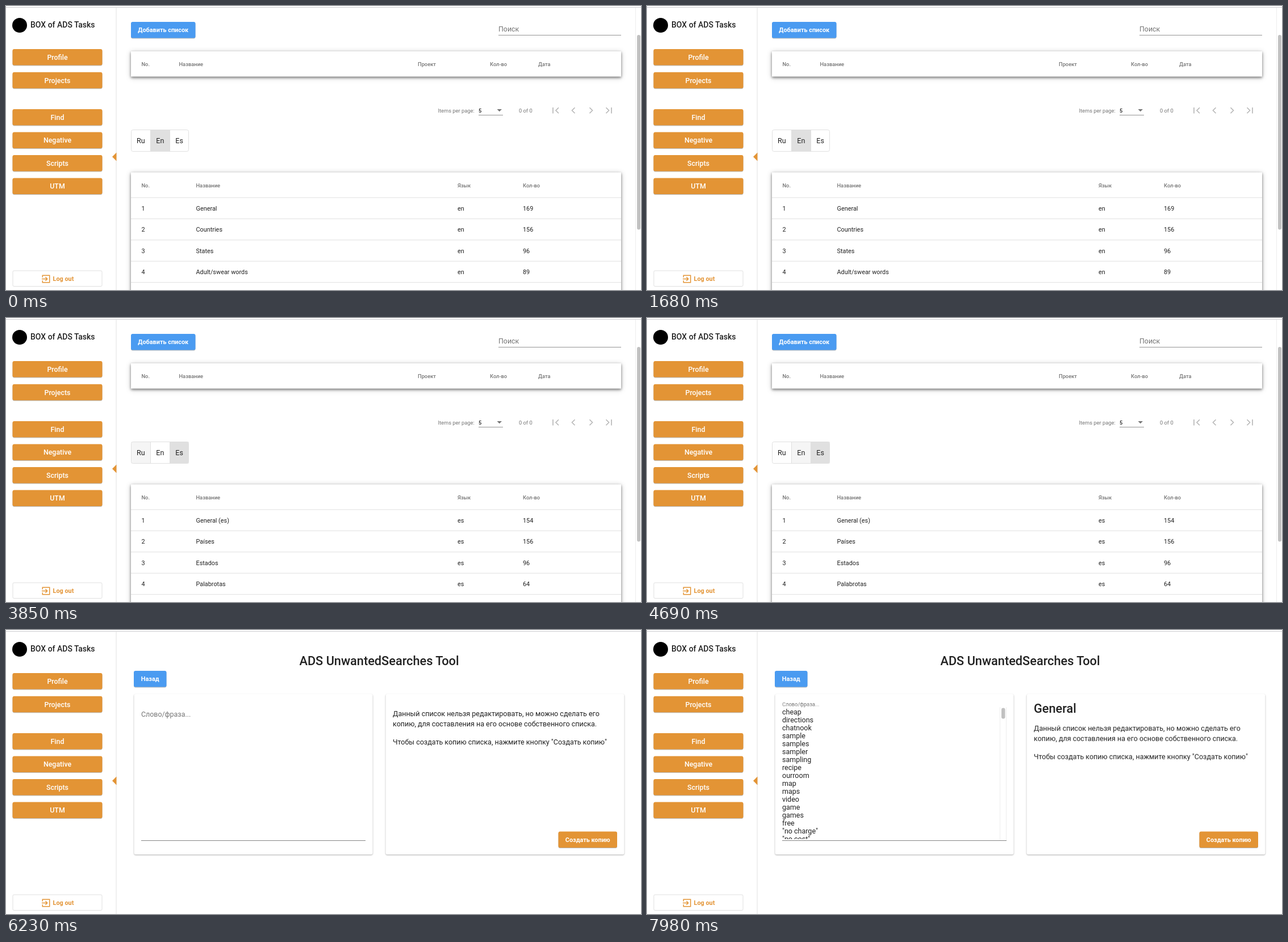
An HTML page for the animation above (8 s loop, 1118x501 px).

```html
<!DOCTYPE html>
<html lang="ru">
<head>
<meta charset="utf-8">
<title>Списки слов</title>
<style>
  html, body { margin: 0; width: 100%; height: 100%; overflow: hidden; background: #fff; }
  svg { display: block; font-family: Roboto, sans-serif; }
  text { fill: #212121; white-space: pre; }
  .body { font-size: 12.5px; }
  .cell { font-size: 10.87px; }
  .head { font-size: 9.32px; font-weight: 500; fill: #757575; }
  .note { font-size: 9.32px; fill: #757575; }
  .strong { font-size: 9.32px; font-weight: 500; }
  .hint { font-size: 12.42px; fill: #757575; }
  .menu { font-size: 12.42px; font-weight: 500; fill: #fff; }
  .action { font-size: 10.87px; font-weight: 700; fill: #fff; }
  .exit { font-size: 10.87px; font-weight: 700; fill: #e39435; }
  .brand { font-size: 13.98px; font-weight: 500; }
  .title { font-size: 21.74px; font-weight: 500; }
  .mid { text-anchor: middle; }
  .line { fill: none; stroke: #e0e0e0; }
  .button { filter: drop-shadow(0 1.2px .7px rgba(0,0,0,.28)); }
  .table { fill: #fff; filter: drop-shadow(0 2px 2px rgba(0,0,0,.45)) drop-shadow(0 1px 4px rgba(0,0,0,.22)); }
  .card { fill: #fff; filter: drop-shadow(0 1px .8px rgba(0,0,0,.32)); }

  .lists, .editor, .en, .es, .words { animation: 8s step-end infinite; }
  .lists { animation-name: lists; }
  .editor { animation-name: editor; }
  .en { animation-name: en; }
  .es { animation-name: es; }
  .words { animation-name: words; }
  .ruTab, .enTab, .esTab { animation: 8s linear infinite; }
  .ruTab { animation-name: ruTab; }
  .enTab { animation-name: enTab; }
  .esTab { animation-name: esTab; }
  .float { animation: float 8s cubic-bezier(.25,.8,.25,1) infinite; }
  .shift { animation: shift 8s step-end infinite; }

  @keyframes lists { 0% { opacity: 1 } 77%, 100% { opacity: 0 } }
  @keyframes editor { 0% { opacity: 0 } 77%, 100% { opacity: 1 } }
  @keyframes en { 0% { opacity: 1 } 35.875% { opacity: 0 } 62.125%, 100% { opacity: 1 } }
  @keyframes es { 0% { opacity: 0 } 35.875% { opacity: 1 } 62.125%, 100% { opacity: 0 } }
  @keyframes words { 0% { opacity: 0 } 79.5%, 100% { opacity: 1 } }
  @keyframes shift { 0% { transform: none } 79.5%, 100% { transform: translateY(25.8px) } }
  @keyframes float {
    0%, 79.5% { transform: translate(238px, 153px) }
    84.5%, 100% { transform: translate(238px, 134.4px) scale(.75) }
  }
  @keyframes ruTab { 0%, 43.75% { fill: #fff } 46%, 56% { fill: #f5f5f5 } 59%, 100% { fill: #fff } }
  @keyframes enTab {
    0%, 35.87% { fill: #e0e0e0 } 35.9%, 56% { fill: #fff } 58%, 62.12% { fill: #f5f5f5 }
    62.6%, 72% { fill: #c8c8c8 } 76%, 100% { fill: #e0e0e0 }
  }
  @keyframes esTab {
    0%, 28% { fill: #fff } 30%, 35.87% { fill: #f5f5f5 } 36.4%, 43.75% { fill: #c8c8c8 }
    47%, 62.12% { fill: #e0e0e0 } 62.2%, 100% { fill: #fff }
  }
</style>
</head>
<body>
<script>
const ORANGE = '#e39435', BLUE = '#4a9bf1';

const text = (x, y, cls, str) => `<text x="${x}" y="${y}" class="${cls}">${str}</text>`;
const rect = (x, y, w, h, attrs = '') => `<rect x="${x}" y="${y}" width="${w}" height="${h}" ${attrs}/>`;
const path = (d, attrs = 'class="line"') => `<path d="${d}" ${attrs}/>`;
const group = (cls, ...parts) => `<g class="${cls}">${parts.join('')}</g>`;
const button = (x, y, w, color, cls, label) =>
  rect(x, y, w, 28.5, `rx="3" fill="${color}" class="button"`) +
  text(x + w / 2, y + (cls === 'menu' ? 18.8 : 18.2), cls + ' mid', label);

const menu = [['Profile', 76], ['Projects', 116.7], ['Find', 182], ['Negative', 222.5], ['Scripts', 263], ['UTM', 303.4]];

const sidebar = group('sidebar',
  path('M0 2.5H1118', 'stroke="#cdcdd0"'),
  path('M194 3V501'),
  '<circle cx="24" cy="34" r="13"/>',
  text(43, 38.3, 'brand', 'BOX of ADS Tasks'),
  ...menu.map(([label, y]) => button(11.5, y, 158, ORANGE, 'menu', label)),
  path('M194.5 258.5V273.5L187 266Z', `fill="${ORANGE}"`),
  rect(12, 467, 157, 27.5, 'rx="2" class="line"'),
  path('M64.3 478.8V475.2H76.7V487.8H64.3V484.2M63 481.5H72.4M69.4 478.2L72.7 481.5L69.4 484.8',
    `fill="none" stroke="${ORANGE}" stroke-width="1.5"`),
  text(82.5, 485, 'exit', 'Log out'));

const rows = (lang, items) => group(lang, ...items.map(([name, count], i) => {
  const y = 361 + i * 37.4;
  return text(334.5, y, 'cell', name) + text(795, y, 'cell', lang) + text(910, y, 'cell', count);
}));

const tab = (x, w, name, label) =>
  rect(x, 218.5, w, 38, `class="${name}"`) + text(x + w / 2, 242, 'body mid', label);

const lists = group('lists',
  button(220, 28, 113.5, BLUE, 'action', 'Добавить список'),
  text(867, 44.8, 'hint', 'Поиск'),
  path('M867 51.5H1083', 'stroke="#949494"'),
  rect(220, 80, 863, 44.5, 'class="table"'),
  ...[[238.5, 'No.'], [304.5, 'Название'], [725, 'Проект'], [852, 'Кол-во'], [937, 'Дата']]
    .map(([x, label]) => text(x, 106, 'head', label)),

  text(760.5, 187.6, 'note', 'Items per page:'),
  text(832, 187.6, 'strong', '5'),
  path('M832 192.5H875', 'stroke="#949494"'),
  path('M864.5 182H873L868.7 186.2Z', 'fill="#757575"'),
  text(903, 187.6, 'note', '0 of 0'),
  path('M963 179V189.5M973 179.3L968 184.3L973 189.3M1001.5 179.3L996.5 184.3L1001.5 189.3' +
    'M1027.5 179.3L1032.5 184.3L1027.5 189.3M1056.5 179.3L1061.5 184.3L1056.5 189.3M1066 179V189.5',
    'fill="none" stroke="#b5b5b5" stroke-width="1.6"'),

  tab(220.5, 33.5, 'ruTab', 'Ru'), tab(254, 34.7, 'enTab', 'En'), tab(288.7, 32.8, 'esTab', 'Es'),
  rect(220.5, 218.5, 101, 38, 'rx="3" class="line"'),
  path('M254.5 218V256M288.5 218V256'),

  rect(220, 293.5, 863, 240, 'class="table"'),
  ...[[238.5, 'No.'], [334.5, 'Название'], [795, 'Язык'], [910, 'Кол-во']]
    .map(([x, label]) => text(x, 320, 'head', label)),
  ...[0, 1, 2, 3, 4].map(i => path(`M220 ${338 + i * 37.4}H1083`)),
  ...[0, 1, 2, 3].map(i => text(238.5, 361 + i * 37.4, 'cell', i + 1)),
  rows('en', [['General', 169], ['Countries', 156], ['States', 96], ['Adult/swear words', 89]]),
  rows('es', [['General (es)', 154], ['Países', 156], ['Estados', 96], ['Palabrotas', 64]]),

  path('M1108.5 3V501', 'stroke="#ededed"'),
  rect(1111, 51, 6, 343.5, 'rx="3" fill="#c1c1c1"'));

const words = ['cheap', 'directions', 'chatnook', 'sample', 'samples', 'sampler', 'sampling', 'recipe', 'ourroom',
  'map', 'maps', 'video', 'game', 'games', 'free', '"no charge"', '"no cost"'];

const editor = group('editor',
  text(657, 61.5, 'title mid', 'ADS UnwantedSearches Tool'),
  button(225, 72, 57.5, BLUE, 'action', 'Назад'),
  rect(225.5, 113, 420, 283, 'rx="3" class="card"'),
  rect(668.5, 113, 420, 283, 'rx="3" class="card"'),
  group('float', text(0, 0, 'hint', 'Слово/фраза...')),
  group('words',
    '<g clip-path="url(#field)">',
    ...words.map((word, i) => text(238, 148.8 + i * 14, 'body', word)),
    '</g>',
    path('M621.5 136V371M632.5 136V371', 'stroke="#ededed"'),
    rect(624, 137.5, 6.5, 19, 'rx="3.2" fill="#c1c1c1"'),
    text(681, 146, 'title', 'General')),
  path('M238 371.5H633', 'stroke="#858585"'),
  group('shift',
    text(681, 151.6, 'body', 'Данный список нельзя редактировать, но можно сделать его'),
    text(681, 170.4, 'body', 'копию, для составления на его основе собственного списка.'),
    text(681, 201.5, 'body', 'Чтобы создать копию списка, нажмите кнопку "Создать копию"')),
  button(972.5, 355.5, 103.5, ORANGE, 'action', 'Создать копию'));

document.body.innerHTML = `<svg width="1118" height="501" viewBox="0 0 1118 501">
  <clipPath id="field">${rect(238, 136, 383, 233)}</clipPath>
  ${sidebar}${lists}${editor}</svg>`;
</script>
</body>
</html>
```
